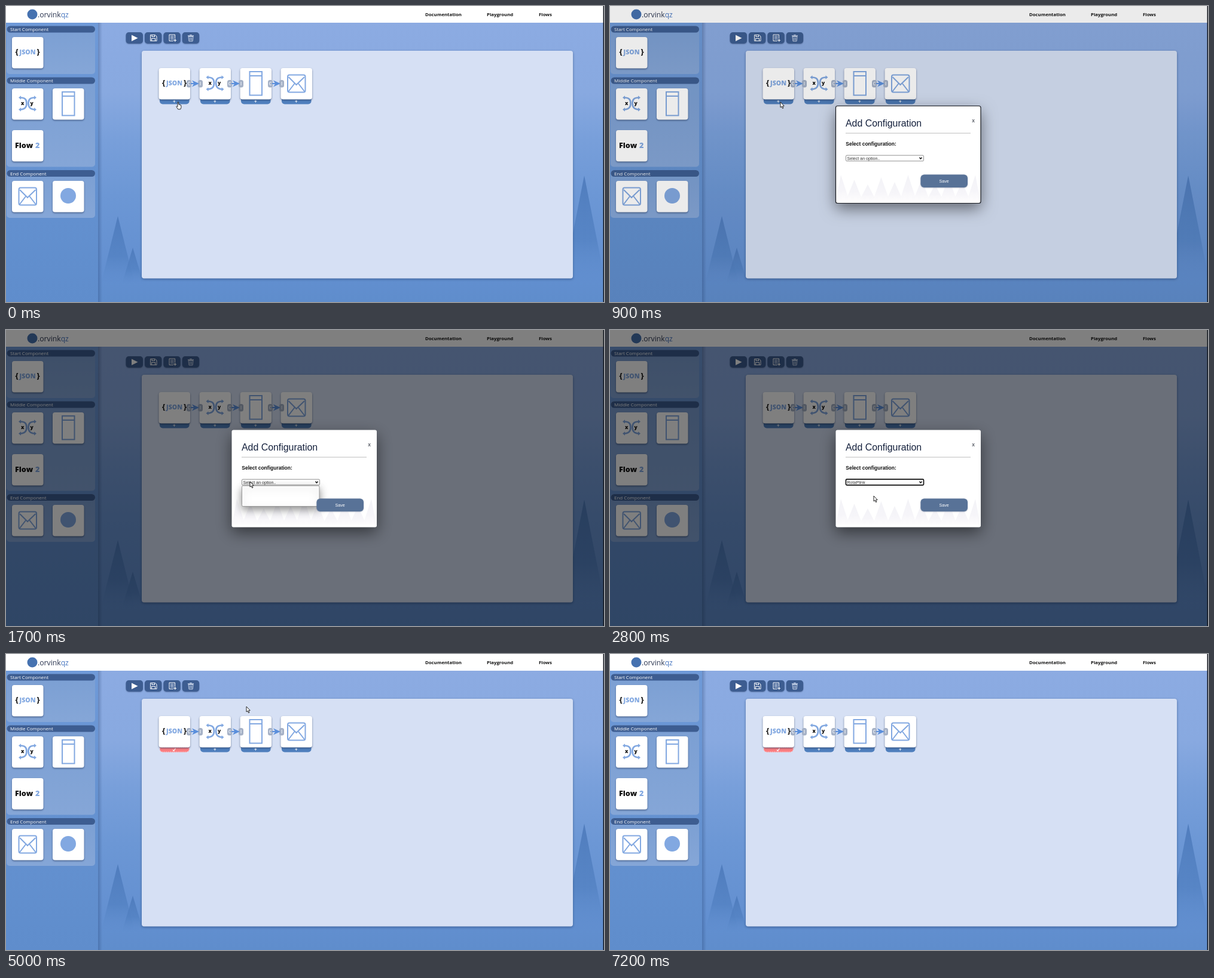
Animation, 1000 px wide and 496 px high, one loop 7300 ms. Source, as an HTML page with a canvas:

```html
<!DOCTYPE html>
<html lang="en">
<head>
<meta charset="utf-8">
<title>Flow editor</title>
<style>
html, body { margin: 0; width: 100%; height: 100%; overflow: hidden; background: #608ecd; }
canvas { display: block; width: 1000px; height: 496px; }
</style>
</head>
<body>
<canvas id="stage" width="1000" height="496"></canvas>
<script>
const ctx = document.getElementById('stage').getContext('2d');
const LOOP = 7300, STEP = 100;
const MODAL_IN = 800, FADE = 400, LIST_IN = 1700, LIST_OUT = 2500, MODAL_OUT = 3500;
const UI = '"Open Sans", "Noto Sans", sans-serif';
const ARIAL = '"Liberation Sans", Arial, sans-serif';
const ICON = '#82a8e1', NAVY = '#3d5d91', TAB = '#4f7fbd';

// Pointer tip over time: [ms, x, y]
const PATH = [
  [0, 287, 161], [500, 285, 161], [1100, 285, 161], [1600, 408, 254], [1800, 408, 254],
  [2200, 413, 278], [2500, 415, 281], [2800, 441, 278], [3200, 552, 293], [3400, 550, 294],
  [4200, 550, 294], [5000, 402, 88], [5200, 390, 50]
];
const POINTER_END = 5300;

function roundRect(x, y, w, h, r, fill, stroke, lineWidth = 1) {
  ctx.beginPath();
  ctx.roundRect(x, y, w, h, r);
  if (fill) { ctx.fillStyle = fill; ctx.fill(); }
  if (stroke) { ctx.strokeStyle = stroke; ctx.lineWidth = lineWidth; ctx.stroke(); }
}

function poly(points, fill, stroke, lineWidth = 1, closed = true) {
  ctx.beginPath();
  points.forEach(([x, y]) => ctx.lineTo(x, y));
  if (closed) ctx.closePath();
  if (fill) { ctx.fillStyle = fill; ctx.fill(); }
  if (stroke) { ctx.strokeStyle = stroke; ctx.lineWidth = lineWidth; ctx.stroke(); }
}

function text(str, x, y, font, color, align = 'left') {
  ctx.font = font;
  ctx.fillStyle = color;
  ctx.textAlign = align;
  ctx.fillText(str, x, y);
}

function shade(y0, y1, stops) {
  const g = ctx.createLinearGradient(0, y0, 0, y1);
  stops.forEach(([at, color]) => g.addColorStop(at, color));
  return g;
}

function withShadow(color, blur, dy, draw) {
  ctx.save();
  ctx.shadowColor = color;
  ctx.shadowBlur = blur;
  ctx.shadowOffsetY = dy;
  draw();
  ctx.restore();
}

function at(x, y, draw) {
  ctx.save();
  ctx.translate(x, y);
  draw();
  ctx.restore();
}

// Icons are drawn around the centre of their card.
const icons = {
  json() {
    text('{', -20.5, 3, `bold 13px ${UI}`, '#111');
    text('JSON', 0, 3, `800 10.5px ${UI}`, ICON, 'center');
    text('}', 20.5, 3, `bold 13px ${UI}`, '#111', 'right');
  },
  swap() {
    for (const side of [-1, 1]) {
      ctx.beginPath();
      ctx.moveTo(side * 12, -10.5);
      ctx.bezierCurveTo(side * 4, -10.5, side * 1.5, -7, side * 1.5, -1);
      ctx.bezierCurveTo(side * 1.5, 5, side * 4, 9.5, side * 12, 9.5);
      ctx.strokeStyle = ICON;
      ctx.lineWidth = 2.6;
      ctx.stroke();
      for (const y of [-10.5, 9.5])
        poly([[side * 11, y - 3.2], [side * 15, y], [side * 11, y + 3.2]], ICON);
    }
    text('x', -8.3, 1.5, `800 8.5px ${UI}`, '#111', 'center');
    text('y', 7.2, 1.5, `800 8.5px ${UI}`, '#111', 'center');
  },
  box() {
    ctx.strokeStyle = ICON;
    ctx.lineWidth = 2;
    ctx.strokeRect(-10, -20, 20.5, 39.5);
    ctx.fillStyle = ICON;
    ctx.fillRect(-10, -14, 20, 2);
  },
  flow() {
    text('Flow', -21, 3.5, `800 12.6px ${UI}`, '#111');
    text('2', 13, 3.5, `800 12.6px ${UI}`, ICON);
  },
  mail() {
    roundRect(-14.5, -14.5, 29.5, 29, 3, null, ICON, 2);
    poly([[-13, -11], [0, 2], [13.5, -11]], null, ICON, 2, false);
    poly([[-13, 13], [-3, 0]], null, ICON, 2, false);
    poly([[13.5, 13], [3.5, 0]], null, ICON, 2, false);
  },
  dot() {
    ctx.beginPath();
    ctx.arc(0, -1, 13, 0, 7);
    ctx.fillStyle = ICON;
    ctx.fill();
  }
};

function card(x, y, icon) {
  withShadow('rgba(30,50,90,.6)', 3, 1.5, () => roundRect(x, y, 52.5, 52.5, 4, '#fff'));
  at(x + 26, y + 26, icons[icon]);
}

function tree(x, top, half, bottom) {
  poly([[x, top], [x + half, bottom], [x - half, bottom]],
    shade(top, bottom, [[0, 'rgba(75,120,185,.85)'], [0.6, 'rgba(80,127,192,.7)'], [1, 'rgba(92,139,203,.05)']]));
}

function backdrop() {
  ctx.fillStyle = shade(28, 496, [[0, '#8cabe2'], [0.25, '#88a9e0'], [0.42, '#789fda'], [0.62, '#6c97d5'], [0.9, '#628fd0'], [1, '#5f8dcc']]);
  ctx.fillRect(0, 0, 1000, 496);
  tree(187, 352, 28, 465);
  tree(212, 405, 18, 465);
  tree(967, 284, 35, 462);
  const g = ctx.createLinearGradient(153, 0, 161, 0);
  g.addColorStop(0, 'rgba(40,70,120,.4)');
  g.addColorStop(1, 'rgba(40,70,120,0)');
  ctx.fillStyle = g;
  ctx.fillRect(153, 28, 8, 468);
  ctx.fillStyle = shade(28, 496, [[0, '#6f9ad8'], [0.5, '#6592d1'], [1, '#5f8dcc']]);
  ctx.fillRect(0, 28, 154, 468);
}

function header() {
  ctx.fillStyle = '#fff';
  ctx.fillRect(0, 0, 1000, 28);
  ctx.beginPath();
  ctx.arc(44, 14, 8.5, 0, 7);
  ctx.fillStyle = '#4672b0';
  ctx.fill();
  const font = `12.2px ${UI}`;
  text('.orvink', 53, 19, font, '#2b3550');
  text('qz', 53 + ctx.measureText('.orvink').width, 19, font, '#4876c0');
  [['Documentation', 701], ['Playground', 804], ['Flows', 891]]
    .forEach(([label, x]) => text(label, x, 16.8, `bold 7.8px ${UI}`, '#111'));
}

function group(title, y, height, cards) {
  roundRect(1, y, 148, height, 5, shade(y, y + height, [[0, '#7b9fd3'], [1, '#85a6d7']]));
  roundRect(1.5, y, 147.5, 11, 5.5, NAVY);
  text(title, 7, y + 8.6, `8px ${UI}`, '#fff');
  cards.forEach(([x, cy, icon]) => card(x, cy, icon));
}

function sidebar() {
  group('Start Component', 33.5, 80.5, [[10, 52, 'json']]);
  group('Middle Component', 119.5, 150, [[10, 138, 'swap'], [78, 138, 'box'], [10, 208, 'flow']]);
  group('End Component', 275, 80, [[10, 293, 'mail'], [78, 293, 'dot']]);
}

function toolbar() {
  for (let i = 0; i < 4; i++)
    withShadow('rgba(30,50,90,.4)', 2, 1, () => roundRect(200.5 + i * 31.4, 44, 28.5, 19, 5, NAVY));
  poly([[210, 48.5], [220.5, 53.7], [210, 59]], '#fff');
  at(246.5, 53.5, () => {
    poly([[-5, -5], [3, -5], [5.5, -2.5], [5.5, 5], [-5, 5]], null, '#fff');
    ctx.strokeRect(-2.5, -5, 4.5, 3);
    ctx.strokeRect(-3, 1, 6, 4);
  });
  at(278, 53.5, () => {
    poly([[2, 5], [-5, 5], [-5, -5.5], [4.5, -5.5], [4.5, 1]], null, '#fff', 1, false);
    for (const y of [-3, -0.5, 2]) poly([[-3, y], [2.5, y]], null, '#dbe4f3', 0.8);
    poly([[2.5, 4], [7, 4]], null, '#fff');
    poly([[4.7, 1.8], [4.7, 6.2]], null, '#fff');
  });
  at(309, 54, () => {
    poly([[-4, -2.5], [4, -2.5], [3, 5], [-3, 5]], null, '#c9d5ea');
    poly([[-5, -4], [5, -4]], null, '#c9d5ea');
    poly([[-1.5, -5.5], [1.5, -5.5]], null, '#c9d5ea');
    for (const x of [-1.3, 1.3]) poly([[x, -1], [x, 3.5]], null, '#c9d5ea', 0.8);
  });
}

function port(x, label) {
  roundRect(x - 4, 124, 8, 12.5, 3.5, '#a5b1c6');
  text(label, x, 133.2, `bold 8px ${UI}`, '#dfe6f1', 'center');
}

function board(configured) {
  withShadow('rgba(30,60,110,.55)', 4, 1.5, () => roundRect(227, 75, 721, 381.5, 4, '#d6e0f4'));
  ['json', 'swap', 'box', 'mail'].forEach((icon, i) => {
    const x = 255.5 + i * 68, done = configured && i === 0;
    roundRect(x + 1.5, 155, 49.5, 9.5, [0, 0, 5, 5], done ? '#fb7d80' : TAB);
    if (done) {
      ctx.setLineDash([2, 1.5]);
      roundRect(x + 2, 156.5, 48.5, 7.5, [0, 0, 4, 4], null, 'rgba(255,235,235,.8)', 0.8);
      ctx.setLineDash([]);
      poly([[x + 23.5, 160.5], [x + 25, 162.5], [x + 28, 158]], null, '#fff', 1.2, false);
    } else {
      text('+', x + 25.8, 163, `bold 8px ${UI}`, '#fff', 'center');
    }
    card(x, 104, icon);
  });
  for (let i = 0; i < 3; i++) {
    const x = 306 + i * 68;
    port(x, 'C');
    port(x + 19, 'I');
    poly([[x + 3, 130], [x + 9, 130]], null, '#5b8fdb', 2);
    poly([[x + 5, 124.5], [x + 17, 130], [x + 5, 135.5], [x + 8.5, 130]], '#5b8fdb');
  }
}

function select(value, focused) {
  roundRect(394.5, 250.2, 130, 9.6, 1.5, '#fff', focused ? '#101010' : '#777', focused ? 1.7 : 0.8);
  text(value, 396.5, 257.6, `7.1px ${ARIAL}`, '#333');
  poly([[517.5, 253.7], [519.5, 256.2], [521.5, 253.7]], null, '#111', 1.4, false);
}

function optionList(ready) {
  withShadow('rgba(0,0,0,.45)', 14, 5, () => roundRect(394.5, 261, 129.5, 34.5, 2, '#fff', '#888', 0.8));
  if (!ready) return;
  ctx.fillStyle = '#d2d2d2';
  ctx.fillRect(395, 278, 128.5, 17);
  text('Select an option..', 397, 272, `7.1px ${ARIAL}`, '#333');
  text('RotaPlink', 397, 289, `7.1px ${ARIAL}`, '#333');
}

function modal(t) {
  withShadow('rgba(0,0,0,.5)', 26, 9, () => roundRect(377.5, 167.5, 242.5, 163, 3, '#fff'));
  for (let i = 0; i < 11; i++) {
    const x = 386 + i * 22.5, top = 283 + (i * 7 % 5) * 4;
    poly([[x, top], [Math.min(x + 14, 619), 326], [Math.max(x - 14, 378), 326]],
      shade(top, 326, [[0, '#f3f3f7'], [0.6, '#f6f5f9'], [1, '#fdfcfd']]));
  }
  if (t < 1200) roundRect(377.5, 167.5, 242.5, 163, 3, null, '#15181f', 1.2);
  text('Add Configuration', 394, 202, `15.9px ${ARIAL}`, '#14203c');
  text('x', 607.7, 194.6, `bold 8.5px ${ARIAL}`, '#5a5f69', 'center');
  ctx.fillStyle = '#bbb';
  ctx.fillRect(394, 212.6, 209, 1);
  text('Select configuration:', 394.3, 234, `bold 8.5px ${ARIAL}`, '#111');
  const chosen = t >= LIST_OUT;
  select(chosen ? 'RotaPlink' : 'Select an option..', chosen);
  const open = t >= LIST_IN && !chosen, ready = t > LIST_IN;
  if (open && !ready) optionList(false);
  withShadow('rgba(40,60,100,.5)', 2, 0.5, () => roundRect(519.5, 282.5, 78.5, 21.5, 6, '#587297'));
  text('Save', 558.7, 295.7, `7.1px ${ARIAL}`, '#fff', 'center');
  if (open && ready) optionList(true);
}

function pointer(t) {
  if (t >= POINTER_END) return;
  const next = PATH.findIndex(p => p[0] > t);
  const b = PATH[next < 0 ? PATH.length - 1 : next];
  const a = next < 0 ? b : PATH[next - 1];
  const k = a === b ? 0 : ease((t - a[0]) / (b[0] - a[0]));
  at(a[1] + (b[1] - a[1]) * k, a[2] + (b[2] - a[2]) * k, () => {
    ctx.lineJoin = 'round';
    if (t < MODAL_IN)
      poly([[0, 0], [1.6, 0], [1.9, 4], [5.5, 5], [6, 8.5], [4.8, 12], [0.6, 12], [-2.2, 7.5], [-1.3, 6.6], [0, 7.8]], '#fff', '#111', 0.9);
    else
      poly([[0, 0], [0, 9], [2, 7.3], [3.5, 10.6], [5, 10], [3.5, 6.8], [6.2, 6.5]], '#fff', '#111', 0.9);
  });
}

function ease(k) {
  k = Math.min(1, Math.max(0, k));
  return k * k * (3 - 2 * k);
}

function render(t) {
  backdrop();
  header();
  sidebar();
  toolbar();
  board(t >= MODAL_OUT);
  const open = t >= MODAL_IN && t < MODAL_OUT;
  if (open) {
    ctx.fillStyle = `rgba(0,0,0,${0.5 * ease((t - MODAL_IN) / FADE)})`;
    ctx.fillRect(0, 0, 1000, 496);
    modal(t);
  }
  pointer(t);
  ctx.fillStyle = '#10141c';
  ctx.fillRect(998.6, 0, 1.4, 496);
}

const start = performance.now();
function tick() {
  const t = (performance.now() - start) % LOOP;
  render(t - t % STEP);
  requestAnimationFrame(tick);
}
tick();
</script>
</body>
</html>
```
